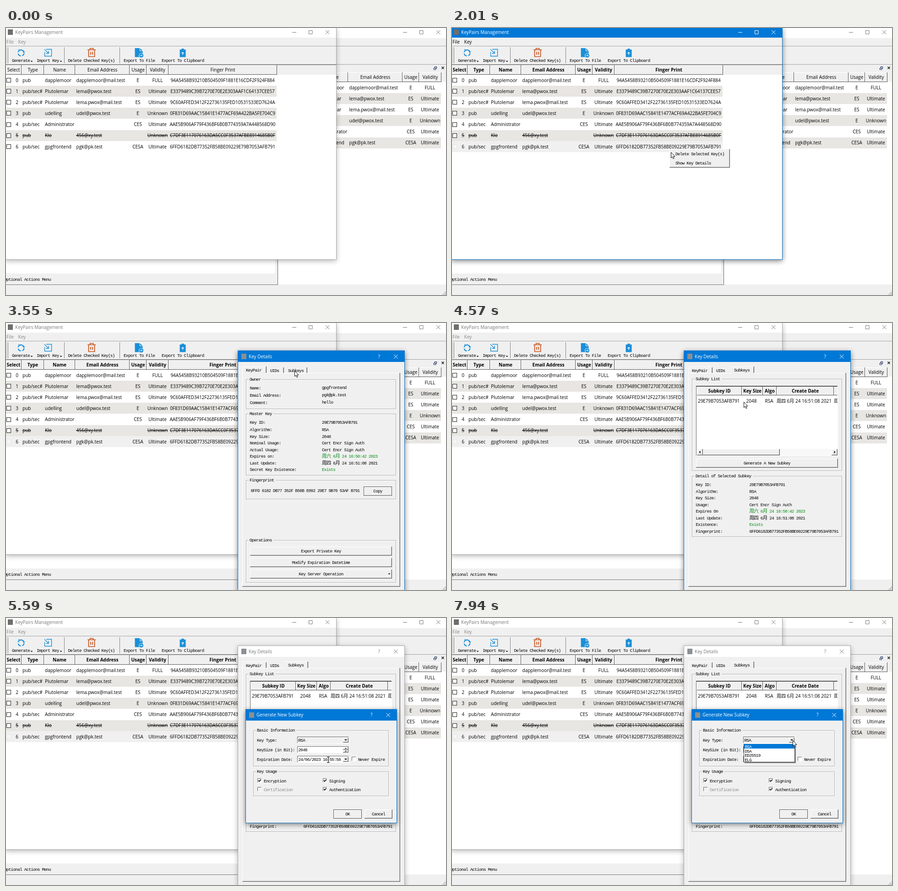
Recreate the animation shown at these times as an HTML page. Size 961x583 px, loop 8000 ms.

```html
<!DOCTYPE html>
<html lang="en">
<head>
<meta charset="utf-8">
<title>Key manager</title>
<style>
html, body { margin: 0; width: 100%; height: 100%; overflow: hidden; background: #f0f0f0; }
svg { display: block; width: 961px; height: 583px; }
text { white-space: pre; fill: #000; }
.s { font: 10px "Open Sans", "Noto Sans CJK SC", "Noto Sans CJK JP", sans-serif; }
.m { font: 9.4px "Liberation Mono", "Noto Sans CJK SC", "Noto Sans CJK JP", monospace; letter-spacing: -.77px; }
.cjk { font-size: 10.5px; }
.fp { letter-spacing: -.09px; }
.b, .sel .hd { font-weight: 700; }
.mid { text-anchor: middle; }
.gone { text-decoration: line-through; }
rect { shape-rendering: crispEdges; }
.win { color: #777; }
.win.on { color: #fff; }
.bar { fill: #fff; }
.on .bar { fill: #0078d7; }
.edge { fill: none; stroke: #a8a8a8; }
.on .edge { stroke: #0a74c8; }
.shade { fill: #000; opacity: .28; filter: url(#blur); }
.on .shade { opacity: .48; }
.cap { fill: currentColor; }
.ctl { stroke: currentColor; fill: none; }
.menu { fill: #888; }
.on .menu { fill: #000; }
</style>
</head>
<body>
<svg id="stage" viewBox="0 0 961 583" xmlns="http://www.w3.org/2000/svg"></svg>
<script>
const BLUE = '#0078d7', FACE = '#f0f0f0', STRIPE = '#e8e6e2', GREEN = '#008a10', ICON = '#1a8fd8';

// Drawing helpers
const box = (x, y, w, h, fill, more = '') =>
  `<rect x="${x}" y="${y}" width="${w}" height="${h}" fill="${fill}" ${more}/>`;
const path = (d, stroke, width = 1, fill = 'none') =>
  `<path d="${d}" stroke="${stroke}" stroke-width="${width}" fill="${fill}"/>`;
const group = (id, ...parts) => `<g id="${id}">${parts.join('')}</g>`;
const text = (x, y, s, cls = '', fill = '') =>
  `<text class="s ${cls}" x="${x}" y="${y + 3.6}"${fill && ` style="fill:${fill}"`}>${s}</text>`;
const mono = (x, y, s, cls = '', fill = '') =>
  `<text class="m ${cls}" x="${x}" y="${y + 3}"${fill && ` style="fill:${fill}"`}>` +
  s.replace(/[\u4e00-\u9fff]+/g, '<tspan class="cjk">$&</tspan>') + '</text>';
const tri = (x, y, r, dir = 'd', fill = '#000') => {
  const d = { d: `M${x - r} ${y - r / 2}h${2 * r}l${-r} ${r}z`, u: `M${x - r} ${y + r / 2}h${2 * r}l${-r} ${-r}z`,
    l: `M${x + r / 2} ${y - r}v${2 * r}l${-r} ${-r}z`, r: `M${x - r / 2} ${y - r}v${2 * r}l${r} ${-r}z` }[dir];
  return path(d, 'none', 0, fill);
};
const bevel = (x, y, w, h) => box(x, y, w, h, '#5c5c5c') + box(x, y, w - 1, h - 1, '#fff') +
  box(x + 1, y + 1, w - 2, h - 2, '#bdbdbd') + box(x + 1, y + 1, w - 3, h - 3, FACE);
const sunk = (x, y, w, h, fill = '#fff') => box(x, y, w, h, '#fff') + box(x, y, w - 1, h - 1, '#6a6a6a') +
  box(x + 1, y + 1, w - 2, h - 2, fill);
const button = (x, y, w, h, label, framed) => (framed
  ? box(x, y, w, h, '#555') + box(x + 1, y + 1, w - 2, h - 2, '#fff') + box(x + 2, y + 2, w - 3, h - 3, FACE)
  : bevel(x, y, w, h)) + mono(x + w / 2, y + h / 2, label, 'mid');
const frame = (x, y, w, h, label) =>
  box(x + 1, y + 1, w, h, 'none', 'stroke="#fff"') +
  `<rect x="${x + .5}" y="${y + .5}" width="${w}" height="${h}" fill="none" stroke="#b0b0b0"/>` +
  box(x + 6, y - 3, label.length * 4.87 + 5, 8, FACE) + mono(x + 8, y, label);
const cross = (x, y) => `<path class="ctl" d="M${x - 4} ${y - 4}l8.5 8.5m0-8.5l-8.5 8.5"/>`;
const controls = x =>
  `<path class="ctl" d="M${x - 4} 9.5h9M${x + 32.5} 5.5h7.5v7.5h-7.5z"/>` + cross(x + 73, 9);
const columns = (y, h, xs, labels, cls) => labels.map((s, i) => {
  const x = xs[i], w = xs[i + 1] - x;
  return box(x, y, w, h, FACE) + box(x, y, w, 1, '#fff') + box(x, y, 1, h, '#fff') +
    box(x + w - 1, y, 1, h, '#555') + box(x, y + h - 1, w, 1, '#555') +
    text(x + w / 2, y + h / 2, s, 'mid ' + cls);
}).join('');
const tick = (x, y, label, on, off) => sunk(x, y, 10, 10, off ? FACE : '#fff') +
  (on ? path(`M${x + 2} ${y + 4.5}l2 2.3l4-4.3`, '#000', 1.6) : '') +
  mono(x + 14, y + 5.5, label, '', off ? '#8a8a8a' : '');
const tabEnd = (x, y) => box(x - 1, y, 1, 109 - y, '#b4b4b4') + box(x, y, 1, 109 - y, '#555');
const pairs = (x1, x2, rows) => rows.map(([y, k, v, fill]) =>
  mono(x1, y, k) + mono(x2, y - (y < 180 ? 1 : 0), v, '', fill || '')).join('');
const win = (id, x, y, w, h, barH, ...parts) => `<g id="${id}" class="win">` +
  `<rect class="shade" x="${x}" y="${y + 3}" width="${w}" height="${h}"/>` + box(x, y, w, h, FACE) +
  `<rect class="bar" x="${x}" y="${y}" width="${w}" height="${barH}"/>` + parts.join('') +
  `<rect class="edge" x="${x + .5}" y="${y + .5}" width="${w - 1}" height="${h - 1}"/></g>`;
const dialogBar = (x, y, label, right) => box(x, y - 6, 11, 12, '#8b8f92') +
  text(x + 16, y, label, 'cap') + text(right - 36, y, '?', 'cap mid') + cross(right, y);

// Key data
const KEYS = [
  ['pub', 'dapplemoor', 'dapplemoor@mail.test', 'E', 'FULL', '94A5458B93210B504509F1881E16CDF2F924F884'],
  ['pub/sec#', 'Plutolemar', 'lema@pwox.test', 'ES', 'Ultimate', 'E3379489C39B7270E70E2E303AAF1C64137CEE57'],
  ['pub/sec#', 'Plutolemar', 'lema.pwox@mail.test', 'ES', 'Ultimate', '9C60AFFED3412F22736135FED10531533ED7624A'],
  ['pub', 'udelling', 'udel@pwox.test', 'E', 'Unknown', '0F831D69AAC15841E1477ACF69A422BA5FE704C9'],
  ['pub/sec', 'Administrator', '', 'CES', 'Ultimate', 'AAE5B906AF79F436BF6B0B774359A7A448568D90'],
  ['pub', 'Klo', '456@xy.test', '', 'Unknown', 'C7DF3E117076163DA5CC0F3537AFBE8914685B0F'],
  ['pub/sec', 'gpgfrontend', 'pgk@pk.test', 'CESA', 'Ultimate', '6FFD6182DB77352FB58BE09229E79B7053AFB791']
];
const PRINT = KEYS[6][5], ID = PRINT.slice(-16);
const MADE = '周四 6月 24 16:51:08 2021', ENDS = '周六 6月 24 16:50:42 2023';
const USES = 'Cert Encr Sign Auth';

const backdrop = () => {
  const rows = KEYS.filter((_, i) => i !== 5).map(([, name, mail, use, valid], i) => {
    const y = 130 + i * 24.15;
    return (i % 2 ? box(594, Math.round(y - 12), 356, 24, STRIPE) : '') + text(681, y, name) + text(749.5, y, mail) +
      text(884, y, use, 'mid') + text(926, y, valid, 'mid');
  }).join('');
  let grip = '';
  for (let i = 0; i < 3; i++) grip += `M${953 + i * 3} 583L961 ${575 + i * 3}`;
  return box(0, 0, 961, 583, FACE) + box(0, 0, 961, 22, '#fff') + box(0, 39, 961, 1, '#a6a6a6') +
    box(0, 79, 961, 1, '#a0a0a0') + box(594, 97, 367, 463, '#fff') + box(0, 500, 588, 36, '#fff') +
    box(593, 97, 1, 464, '#666') + box(0, 560, 594, 1, '#777') + box(950, 97, 11, 20, FACE) +
    columns(97, 21, [594, 678, 747, 866, 902, 951], ['', 'Name', 'Email Address', 'Usage', 'Validity'], '') +
    rows + `<g class="win">${controls(871)}</g>` +
    path('M934.5 87.5h4v3.5h-4zM936.5 87v-2.5h4v4h-2', '#2a3a66', 1.2) +
    path('M951.5 84.5l5 5m0-5l-5 5', '#222', 1.5) +
    mono(-4, 549, 'Optional Actions Menu') + path(grip, '#9a9a9a');
};

const toolbar = () => {
  const split = x => box(x, 42, 1, 35, '#777') + box(x + 1, 42, 1, 35, '#fff');
  return box(0, 39, 721, 1, '#a6a6a6') + box(0, 79, 721, 2, '#8c8c8c') + box(1, 42, 1, 35, '#bbb') +
    [4, 127, 248].map(split).join('') +
    mono(13, 70.5, 'Generate') + tri(56, 73, 2.5) + mono(67, 70.5, 'Import Key') + tri(120, 73, 2.5) +
    mono(135.5, 70.5, 'Delete Checked Key(s)') + mono(257, 70.5, 'Export To File') +
    mono(340, 70.5, 'Export To Clipboard') +
    path('M29.5 49A6.5 6.5 0 0 1 39 52M39.5 55A6.5 6.5 0 0 1 35.5 60.5M32.5 61A6.5 6.5 0 0 1 26.7 56M26.5 53A6.5 6.5 0 0 1 28 50', ICON, 2.2) +
    tri(39, 53, 3, 'd', ICON) + tri(29, 48.5, 3, 'r', ICON) +
    path('M88 46.5h11.5v15h-15v-9M84 46.5l8.5 8.5M93 50v5.5h-5.5', ICON, 1.4) +
    path('M178 47.5h18M183.5 47v-2.5h7v2.5M180.5 48v14.5h13V48M185 52v6.5M189 52v6.5', '#c4501b', 1.7) +
    path('M281.5 44h11l6 6v13.5h-17z', 'none', 0, ICON) + path('M292.5 44v6h6', '#fff') +
    `<circle cx="295.5" cy="60" r="5" fill="${ICON}" stroke="#f0f0f0"/>` + path('M292.5 60h5m-2-2l2 2l-2 2', '#fff') +
    path('M379.5 47h4v-2h5v2h4v16.5h-13z', 'none', 0, ICON) + path('M386 59v-6m-2.5 2.5l2.5-2.5l2.5 2.5', '#fff', 1.2);
};

const keyTable = () => KEYS.map((k, i) => {
  const y = 114 + i * 24.15, top = Math.round(y - 12), cls = i === 5 ? 'gone' : '';
  return (i % 2 ? box(0, top, 591, 24, STRIPE) : '') +
    (i === 6 ? group('picked', box(0, top, 591, 24, FACE)) : '') +
    `<rect ${i === 6 ? 'id="pickBox"' : ''} x="1.5" y="${Math.round(y) - 4.5}" width="9" height="9" fill="#fff" stroke="#222"/>` +
    text(24, y, i, 'mid ' + cls) + text(36, y, k[0], cls) + text(85, y, k[1], cls) + text(153.5, y, k[2], cls) +
    text(288, y, k[3], 'mid ' + cls) + text(331, y, k[4], 'mid ' + cls) + text(473, y, k[5], 'mid fp ' + cls);
}).join('');

const mainWindow = () => win('main', -2, -1, 724, 507, 22,
  box(4, 3, 11, 12, '#6d6f6c'), text(20, 9.5, 'KeyPairs Management', 'cap'), controls(629),
  text(1, 30.5, 'File', 'menu'), text(26.5, 30.5, 'Key', 'menu'),
  toolbar(), box(0, 102, 721, 403, '#fff'),
  columns(81, 21, [-1, 34, 83, 151, 270, 307, 355, 592],
    ['Select', 'Type', 'Name', 'Email Address', 'Usage', 'Validity', 'Finger Print'], 'hd'),
  keyTable());

const contextMenu = () => group('popup', bevel(475, 264, 132, 41),
  group('hover', box(478, 285, 124, 18, BLUE)), mono(488, 275, 'Delete Selected Key(s)'),
  mono(488, 294.5, 'Show Key Details'));

const pairPage = () => group('pairPage',
  box(518, 108, 49, 2, FACE), tabEnd(568, 95), tabEnd(606, 97), tabEnd(657, 97),
  mono(524, 102.5, 'KeyPair'), mono(577, 103.5, 'UIDs'), mono(616, 103.5, 'Subkeys'),
  frame(524, 123, 327, 64, 'Owner'),
  pairs(532.5, 690, [[142, 'Name:', 'gpgfrontend'], [158, 'Email Address:', 'pgk@pk.test'], [174, 'Comment:', 'hello']]),
  frame(524, 198, 327, 134, 'Master Key'),
  pairs(532.5, 690, [[217, 'Key ID:', ID], [233, 'Algorithm:', 'RSA'], [247.5, 'Key Size:', '2048'],
    [262, 'Nominal Usage:', USES], [276.5, 'Actual Usage:', USES], [291, 'Expires on:', ENDS, GREEN],
    [305.5, 'Last Update:', MADE], [320, 'Secret Key Existence:', 'Exists', GREEN]]),
  frame(524, 343, 327, 41, 'Fingerprint'), mono(534.5, 366, PRINT.match(/.{4}/g).join(' ')),
  button(781, 357, 62, 20, 'Copy', true),
  frame(524, 474, 327, 92, 'Operations'), button(533, 488, 310, 20, 'Export Private Key'),
  button(533, 513, 310, 20, 'Modify Expiration Datetime'), button(533, 538, 310, 20, 'Key Server Operation'),
  tri(837, 548, 2.5));

const subPage = () => group('subPage',
  box(608, 108, 51, 2, FACE), tabEnd(568, 97), tabEnd(659, 95), box(608, 95, 51, 1, '#fff'),
  mono(524, 103.5, 'KeyPair'), mono(577, 103.5, 'UIDs'), mono(616, 102.5, 'Subkeys'),
  frame(524, 122, 327, 200, 'Subkey List'), sunk(533, 137, 310, 153), box(534, 138, 308, 1, '#444'),
  columns(139, 19, [535, 633, 679, 709, 834], ['Subkey ID', 'Key Size', 'Algo', 'Create Date'], 'b'),
  box(834, 139, 8, 19, FACE), box(834, 157, 8, 1, '#555'),
  text(537, 170, ID, 'fp'), text(654, 170, '2048', 'mid'), text(692.5, 170, 'RSA', 'mid'), text(709, 170, MADE),
  `<g clip-path="url(#cell)">${text(834, 170, ENDS)}</g>`,
  box(535, 275, 307, 14, '#f8f8f8'), bevel(535, 275, 13, 14), bevel(548, 275, 168, 14), bevel(829, 275, 13, 14),
  tri(541, 282, 3, 'l'), tri(836, 282, 3, 'r'),
  button(533, 296, 310, 20, 'Generate A New Subkey'), group('press', box(533, 296, 310, 1, '#555'), box(533, 296, 1, 19, '#555')),
  frame(524, 334, 327, 132, 'Detail of Selected Subkey'),
  pairs(532.5, 649.5, [[353, 'Key ID:', ID], [367.5, 'Algorithm:', 'RSA'], [382, 'Key Size:', '2048'],
    [396.5, 'Usage:', USES], [411, 'Expires On', ENDS, GREEN], [425.5, 'Last Update:', MADE],
    [440, 'Existence:', 'Exists', GREEN], [454.5, 'Fingerprint:', PRINT]]));

const detailWindow = () => win('details', 506, 60, 365, 530, 25,
  dialogBar(514, 73, 'Key Details', 851),
  box(516, 109, 344, 1, '#fff'), box(516, 95, 1, 480, '#fff'), box(518, 95, 50, 1, '#fff'),
  box(859, 109, 1, 466, '#b4b4b4'), box(860, 109, 1, 467, '#666'),
  box(517, 574, 343, 1, '#b4b4b4'), box(516, 575, 345, 1, '#666'), pairPage(), subPage());

const drop = (x, y) => bevel(x, y, 12, 11) + tri(x + 6, y + 5.5, 3);
const newWindow = () => win('create', 523, 199, 331, 249, 25,
  dialogBar(531, 211.5, 'Generate New Subkey', 834.5),
  frame(540, 245, 295, 78, 'Basic Information'),
  mono(548, 267, 'Key Type:'), mono(548, 288, 'KeySize (in Bit):'), mono(548, 309, 'Expiration Date:'),
  sunk(636, 259, 113, 15, FACE), mono(638.5, 267, 'RSA'), drop(736, 261),
  sunk(636, 280, 113, 15), mono(638.5, 288, '2048'), bevel(736, 281, 12, 7), bevel(736, 288, 12, 6),
  tri(742, 284.5, 2, 'u'), tri(742, 291, 2),
  sunk(636, 301, 113, 15), mono(638.5, 309, '24/06/2023 16:55:58'), drop(736, 303),
  tick(755, 303, 'Never Expire'),
  frame(540, 335, 295, 53, 'Key Usage'),
  tick(549, 350, 'Encryption', true), tick(692, 350, 'Signing', true),
  tick(549, 369, 'Certification', false, true), tick(692, 369, 'Authentication', true),
  button(715, 418, 62, 20, 'OK', true), button(783, 418, 61, 20, 'Cancel'),
  group('list', box(639, 277, 112, 40, '#888'), box(637, 275, 112, 40, '#444'), box(638, 275, 110, 39, '#fff'),
    box(638, 275, 110, 10, BLUE), mono(639.5, 280.5, 'RSA', '', '#fff'), mono(639.5, 290.5, 'DSA'),
    mono(639.5, 300, 'ED25519'), mono(639.5, 309.5, 'ELG')));

const cursors = () =>
  group('arrow', path('M.5 .5v12.2l2.8-2.6l1.9 4.5l2-.9l-1.9-4.3h3.7z', '#111', 1, '#fff')) +
  group('beam', path('M-3-5.5h2.3l.7.7l.7-.7h2.3M0-5v11M-3 6.5h2.3l.7-.7l.7.7h2.3', '#000', 1.1));

document.getElementById('stage').innerHTML =
  `<defs><filter id="blur" x="-10%" y="-10%" width="120%" height="120%"><feGaussianBlur stdDeviation="6"/></filter>
  <clipPath id="cell"><rect x="834" y="160" width="8" height="20"/></clipPath>
  <clipPath id="half"><rect x="630" y="270" width="130" height="25"/></clipPath></defs>` +
  backdrop() + mainWindow() + contextMenu() + detailWindow() + newWindow() + cursors();

// Pointer moves: start, end, steps, from, control point, to
const MOVES = [
  [70, 150, 2, 758, 543, 710, 530, 662, 517],
  [300, 1070, 11, 662, 517, 545, 370, 474, 269],
  [1150, 1230, 2, 474, 269, 474, 266, 474, 264],
  [2010, 2310, 5, 474, 264, 483, 281, 495, 296],
  [2940, 3550, 9, 495, 296, 570, 190, 630, 104],
  [3870, 4100, 4, 630, 104, 615, 106, 600, 107],
  [4350, 5120, 11, 600, 107, 652, 190, 700, 307],
  [5200, 5200, 1, 700, 307, 701, 307, 702, 308],
  [5590, 5590, 1, 702, 308, 703, 309, 704, 309],
  [6140, 6140, 1, 704, 309, 704, 309, 704, 310],
  [6290, 6880, 8, 704, 310, 600, 325, 630, 337],
  [7030, 7800, 10, 630, 337, 660, 378, 744, 267]
];
const pointer = t => {
  const move = MOVES.filter(m => m[0] <= t).pop();
  if (!move) return null;
  const [t0, t1, n, x0, y0, cx, cy, x1, y1] = move;
  const k = Math.min(n, Math.floor((t - t0) / (t1 - t0 || 1) * (n - 1) + .2) + 1), p = k / n, q = 1 - p;
  const at = (a, b, c) => Math.round(q * q * a + 2 * p * q * b + p * p * c);
  return [at(x0, cx, x1), at(y0, cy, y1)];
};

const $ = id => document.getElementById(id);
const show = (id, on) => { $(id).style.display = on ? '' : 'none'; };
const inside = (v, a, b) => v >= a && v < b;

function draw(t) {
  const at = pointer(t), [x, y] = at || [0, 0], picked = t >= 1230;
  $('main').classList.toggle('on', inside(t, 1150, 2710));
  $('main').classList.toggle('sel', picked);
  show('picked', picked);
  $('pickBox').setAttribute('stroke', picked ? '#e6e6e6' : '#222');
  $('pickBox').setAttribute('fill', picked ? '#f6f6f6' : '#fff');
  show('popup', inside(t, 1780, 2620));
  $('popup').style.opacity = t < 1840 ? .5 : 1;
  const hot = y > 284;
  show('hover', hot);
  $('popup').lastChild.style.fill = hot ? '#fff' : '#000';
  show('details', t >= 2710);
  $('details').classList.toggle('on', t < 5510);
  show('pairPage', t < 3800);
  show('subPage', t >= 3800);
  show('press', inside(t, 5430, 5510));
  show('create', t >= 5510);
  $('create').classList.add('on');
  show('list', t >= 7870);
  $('list').setAttribute('clip-path', t < 7940 ? 'url(#half)' : 'none');
  const beam = t >= 5590 && inside(x, 637, 735) && (inside(y, 281, 295) || inside(y, 302, 316));
  show('arrow', at && !beam);
  show('beam', beam);
  $(beam ? 'beam' : 'arrow').setAttribute('transform', `translate(${x} ${y})`);
}

const start = performance.now();
function loop() {
  draw((performance.now() - start) % 8000);
  requestAnimationFrame(loop);
}
loop();
</script>
</body>
</html>
```
